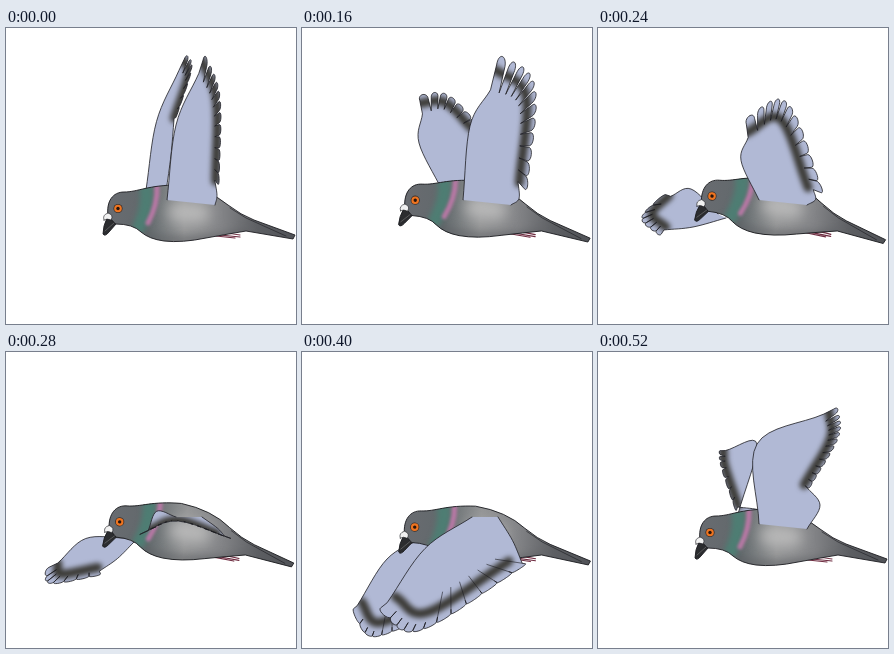
Animation, 290 px wide and 296 px high, one loop 0.56 s. Source, as an HTML page with a canvas:

```html
<!DOCTYPE html>
<html lang="en">
<head>
<meta charset="utf-8">
<title>Flying pigeon</title>
<style>
html, body { margin: 0; width: 100%; height: 100%; overflow: hidden; background: #fff; }
canvas { display: block; }
</style>
</head>
<body>
<canvas id="stage" width="290" height="296"></canvas>
<script>
const ctx = document.getElementById('stage').getContext('2d');
const INK = '#1d1e22', STEP = 40, STEPS = 14;

// Each wing hangs between a root and an end on the body, both given for the
// raised and the lowered wing. Three feather tips travel along key points.
const nearWing = {
  feathers: 12,
  root: [[161, 172], [170, 165]],
  end: [[209, 177], [196, 165]],
  first: [[197, 22], [191, 27], [193, 24], [143, 93], [120, 274], [76, 258], [239, 52]],
  middle: [[214, 68], [221, 55], [233, 57], [189, 74], [152, 264], [118, 279], [241, 84]],
  last: [[213, 158], [214, 153], [225, 164], [226, 166], [227, 208], [225, 212], [211, 137]]
};
const farWing = {
  feathers: 7,
  root: [[140, 162], [120, 186]],
  end: [[160, 164], [128, 190]],
  first: [[179, 25], [159, 31], [112, 68], [66, 166], [13, 268], [50, 258], [121, 96]],
  middle: [[186, 40], [182, 31], [145, 66], [43, 190], [45, 274], [68, 285], [123, 115]],
  last: [[170, 90], [187, 62], [178, 98], [62, 208], [128, 238], [110, 272], [138, 160]]
};
const FOLDED_WRIST = [159, 92];

const lerp = (a, b, u) => a + (b - a) * u;
const clamp = v => Math.max(0, Math.min(1, v));
const mix = (p, q, u) => p.map((v, i) => lerp(v, q[i], u));
const shift = (p, dx, dy) => [p[0] + dx, p[1] + dy];
const wave = (phase, peak) => Math.cos(2 * Math.PI * (phase - peak));

function along(points, position) {
  const i = Math.min(points.length - 2, Math.floor(position));
  return mix(points[i], points[i + 1], position - i);
}

// Catmull-Rom curve through all points, u from 0 to 1.
function curve(points, u) {
  const count = points.length - 1;
  const i = Math.min(count - 1, Math.floor(u * count)), t = u * count - i;
  const b = points[i], c = points[i + 1];
  const a = points[i - 1] || mix(c, b, 2), d = points[i + 2] || mix(b, c, 2);
  return b.map((v, n) => v + t / 2 * (c[n] - a[n] +
    t * (2 * a[n] - 5 * v + 4 * c[n] - d[n] + t * (3 * (v - c[n]) + d[n] - a[n]))));
}

function trace(path, points) {
  for (let i = 0; i <= 16; i++) path.lineTo(...curve(points, i / 16));
}

function soft(path, color, width, blur) {
  ctx.filter = `blur(${blur}px)`;
  outline(path, width, color);
  ctx.filter = 'none';
}

function outline(path, width, color = INK) {
  ctx.strokeStyle = color;
  ctx.lineWidth = width;
  ctx.stroke(path);
}

function paint(path, fill, width) {
  ctx.fillStyle = fill;
  ctx.fill(path);
  outline(path, width);
}

function drawWing(wing, step) {
  const phase = step / STEPS;
  const key = Math.min(step / 2, 5 + (step - 10) / 3);
  const [first, middle, last] = [wing.first, wing.middle, wing.last].map(p => along(p, key));
  const lowered = clamp((first[1] - 100) / 60);
  const fold = clamp(key - 5);
  const root = mix(...wing.root, lowered), end = mix(...wing.end, lowered);
  const wrist = mix(shift(mix(root, first, .5), -9 * (1 - lowered), -15 * lowered), FOLDED_WRIST, fold);
  const focus = mix(wrist, last, .25);
  const elbow = shift(mix(last, end, .5), 12 * fold, -4 * fold);

  const depth = .27 + .15 * wave(phase, .26);
  const band = .19 + .09 * wave(phase, .55);
  const sweep = clamp(1 - Math.abs(step - 10) / 2);

  // Point on feather u, from its tip (0) towards the focus (1).
  const inward = (u, amount) => mix(curve([first, middle, last], u ** .75), focus, amount);
  const slot = u => depth * lerp(1, .5, u);

  const shape = new Path2D(), stripe = new Path2D(), quills = new Path2D();
  trace(shape, [root, wrist, inward(0, slot(0))]);
  for (let i = 0; i < wing.feathers; i++) {
    const u = i / wing.feathers, v = (i + 1) / wing.feathers;
    const gap = .16 * (1 - u) * (1 - lowered);
    const left = lerp(u, v, gap), right = lerp(v, u, gap), length = slot(v);
    shape.lineTo(...inward(left, length * .3));
    shape.bezierCurveTo(...inward(left, -length * .1), ...inward(right, -length * .1), ...inward(right, length * .3));
    shape.lineTo(...inward(v, length));
    if (sweep && u > .35) {
      quills.moveTo(...inward(v, length));
      quills.lineTo(...inward(v, length + .35 * sweep));
    }
  }
  trace(shape, [inward(1, slot(1)), elbow, end]);
  for (let i = 0; i <= 24; i++) stripe.lineTo(...inward(i / 24, band));

  ctx.fillStyle = '#b1b9d5';
  ctx.fill(shape);
  ctx.save();
  ctx.clip(shape);
  soft(stripe, '#3b3a36', 9, 2.5);
  ctx.restore();
  outline(shape, .8);
  outline(quills, .6);
}

const body = new Path2D('M102 188C100 173 107 164 118 164C132 164 142 157 172 157Q203 161 222 177Q235 187 248 192L289 207L287 211L240 203Q222 206 200 210Q176 215 158 213Q143 211 135 204Q127 196 110 196Z');
const beak = new Path2D('M101 190Q97 198 97 206Q99 209 103 204L110 196Q107 190 101 190Z');
const cere = new Path2D('M98 192Q96 187 102 185Q108 187 105 192Q101 190 98 192Z');
const mouth = new Path2D('M99 203L108 195');
const foot = new Path2D('M205 207Q218 204 234 207M210 208L229 210M214 207L234 209');
const neck = new Path2D('M140 160Q143 178 133 199');
const collar = new Path2D('M151 158Q152 176 142 195');
const belly = new Path2D('M128 203Q160 221 240 205');
const flank = new Path2D('M172 184L194 185');
const tailLine = new Path2D('M224 180L240 190L280 208');

const plumage = ctx.createLinearGradient(104, 0, 290, 0);
['#686b70', '#62696c', '#959697', '#838487', '#5c5e62', '#505257']
  .forEach((color, i, all) => plumage.addColorStop(i / (all.length - 1), color));

function disc(x, y, r, color) {
  ctx.beginPath();
  ctx.arc(x, y, r, 0, 7);
  ctx.fillStyle = color;
  ctx.fill();
}

function drawBody(step) {
  const tilt = 5.6 * Math.min(step / 6, (13 - step) / 7);
  ctx.save();
  ctx.translate(240, 195);
  ctx.rotate(tilt * Math.PI / 180);
  ctx.translate(-240, -195);
  outline(foot, 1.2, '#6e2c40');
  paint(beak, '#2b2c2f', .9);
  ctx.fillStyle = plumage;
  ctx.fill(body);
  ctx.save();
  ctx.clip(body);
  soft(flank, '#b9b9b9', 20, 7);
  soft(belly, '#5d5f63', 5, 4);
  soft(neck, '#4e7d73', 13, 2.5);
  soft(collar, '#b878a5', 5, 1.5);
  ctx.restore();
  outline(body, .9);
  outline(tailLine, .6);
  paint(cere, '#f1f1f1', .6);
  outline(mouth, .6, '#777');
  disc(112, 180.5, 4.6, '#3a302c');
  disc(112, 180.5, 3.8, '#ee7420');
  disc(112, 180.5, 1.7, '#26140c');
  ctx.restore();
}

function draw(now) {
  const step = Math.floor(now / STEP) % STEPS;
  ctx.fillStyle = '#fff';
  ctx.fillRect(0, 0, 290, 296);
  drawWing(farWing, step);
  drawBody(step);
  drawWing(nearWing, step);
  requestAnimationFrame(draw);
}

ctx.lineJoin = ctx.lineCap = 'round';
requestAnimationFrame(draw);
</script>
</body>
</html>
```
